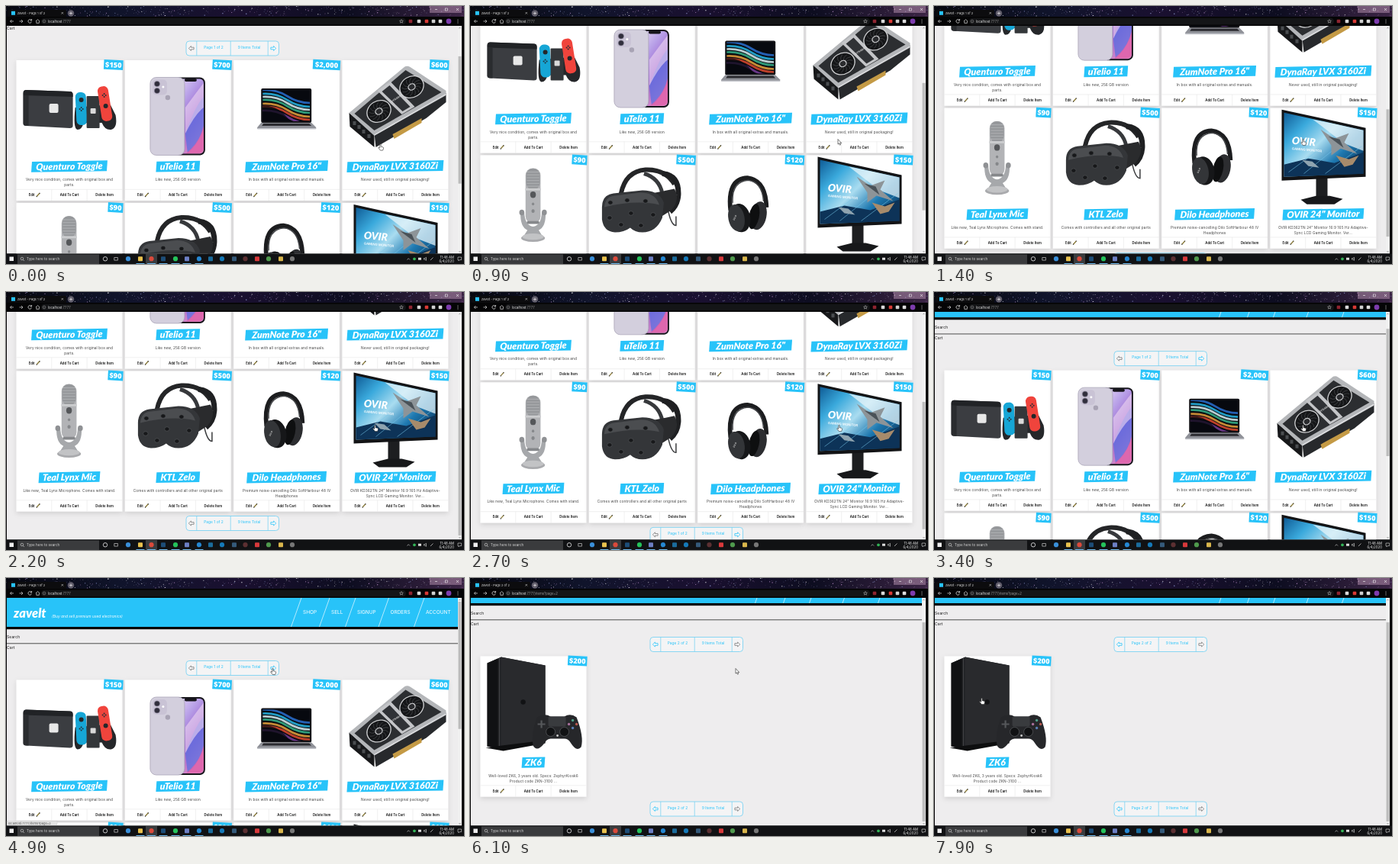
An HTML page that plays this animation: 600 by 338 pixels, repeating every 8 s.

```html
<!DOCTYPE html>
<html lang="en">
<head>
<meta charset="utf-8">
<title>Shop scroll</title>
<style>
  html, body { margin: 0; width: 100%; height: 100%; overflow: hidden; background: #000; }
  svg { display: block; width: 100vw; height: 100vh; }
  text { font-family: Inter, "Open Sans", sans-serif; }
  .bold { font-family: Lato, "Open Sans", sans-serif; font-weight: 900; font-style: italic; }
  .price { font-family: "Open Sans", Inter, sans-serif; font-weight: 800; }
  .note { letter-spacing: .11px; }
  .mid { text-anchor: middle; }
</style>
</head>
<body>
<svg id="stage" viewBox="0 0 600 338" xmlns="http://www.w3.org/2000/svg"></svg>
<script>
const BLUE = '#28c3f9', LOOP = 8000;
const CARD_W = 138.8, PITCH = 142.3, LEFT = 13.6, ROWS = [133.5, 320.5];

const rect = (x, y, w, h, fill, more = '') => `<rect x="${x}" y="${y}" width="${w}" height="${h}" fill="${fill}" ${more}/>`;
const dot = (x, y, r, fill, more = '') => `<circle cx="${x}" cy="${y}" r="${r}" fill="${fill}" ${more}/>`;
const oval = (x, y, rx, ry, fill, more = '') => `<ellipse cx="${x}" cy="${y}" rx="${rx}" ry="${ry}" fill="${fill}" ${more}/>`;
const path = (d, fill = 'none', more = '') => `<path d="${d}" fill="${fill}" ${more}/>`;
const line = (d, stroke, w = 1, more = '') => path(d, 'none', `stroke="${stroke}" stroke-width="${w}" ${more}`);
const text = (x, y, size, str, fill = '#222', more = '') => `<text x="${x}" y="${y}" font-size="${size}" fill="${fill}" ${more}>${str}</text>`;
const group = (move, body, more = '') => `<g transform="${move}" ${more}>${body}</g>`;
const gradient = (id, stops, x2, y2) => `<linearGradient id="${id}" x1="0" y1="0" x2="${x2}" y2="${y2}">` +
  stops.map((c, i) => `<stop offset="${i / (stops.length - 1)}" stop-color="${c}"/>`).join('') + '</linearGradient>';

let seed = 11;
const rnd = () => (seed = seed * 16807 % 2147483647) / 2147483647;

// Product pictures, drawn from the card's top left corner
const art = {
  console: () =>
    path('M9 43Q9 39 13 39L70 41Q74 41 74 45V86Q74 89 70 89L13 86Q9 86 9 83Z', '#3b3d41') +
    path('M13 39L70 41Q74 41 74 45V48L9 46V43Q9 39 13 39Z', '#212326') + path('M9 46L16 46V86L13 86Q9 86 9 83Z', '#2a2c2f') +
    rect(43, 57, 12, 12, '#e8e8e8', 'rx="2"') +
    path('M77 62Q74 90 80 91Q86 91 88 82H112Q116 92 124 91Q133 89 130 72L123 58Z', '#25272a') +
    rect(78, 42, 14, 43, '#16a6d6', 'rx="6" transform="rotate(-3 85 64)"') +
    rect(92, 47, 17, 42, '#34373a', 'rx="1"') + rect(97, 63, 7, 7, '#d9d9d9', 'rx="1"') +
    rect(109, 34, 14, 46, '#f0443c', 'rx="6" transform="rotate(-9 116 57)"') +
    dot(85, 52, 3, '#24272a') + dot(117, 60, 3, '#24272a') +
    [[83, 64], [87, 64], [85, 62], [85, 66], [113, 46], [117, 46], [115, 44], [115, 48]].map(p => dot(...p, 1, '#263038')).join(''),

  phone: () =>
    rect(64, 22.5, 41, 102, '#17161c', 'rx="7"') + rect(66, 24.5, 37, 98, 'url(#wall)', 'rx="5"') +
    path('M79 96Q92 60 103 48V88Q98 108 82 122Z', '#5b6ee0', 'opacity=".75"') +
    path('M79 62Q95 40 103 30V62Q92 70 79 96Z', '#f1d9f2', 'opacity=".6"') +
    path('M103 86V116Q102 122 96 122H80Q98 108 103 86Z', '#e05fa8', 'opacity=".8"') + rect(78, 24, 16, 4, '#17161c', 'rx="2"') +
    rect(33, 22.5, 45, 102, '#d3cfdd', 'rx="8" stroke="#aaa5b8" stroke-width=".8"') +
    rect(36, 25.5, 19, 20, '#c9c3d5', 'rx="5"') +
    [[42, 31], [42, 40]].map(p => dot(...p, 3.6, '#302e3c', 'stroke="#8e899c" stroke-width=".6"')).join('') +
    dot(50, 35, 1.5, '#fff') + dot(56, 49, 3.2, '#a8a3b4'),

  laptop: () =>
    rect(36, 37, 66, 45, '#141418', 'rx="2"') + rect(38, 39, 62, 41, '#07090f') +
    group('translate(0 0)',
      [['#2a6fd0', 47], ['#27b7e4', 52], ['#d9f1f5', 56], ['#36b38a', 60], ['#e8a23c', 65], ['#de4a2f', 69], ['#7a3f9c', 74]].map(([c, y]) =>
        line(`M38 ${y - 8}Q56 ${y - 9} 70 ${y}T100 ${y + 9}`, c, 2.7, 'opacity=".85"')).join('') +
      path('M38 60Q58 58 74 80H38Z', '#07090f', 'opacity=".75"'), 'clip-path="url(#screen)"') +
    path('M36 82H102L108 88V90H31V88Z', '#8f9198') + path('M39 83H99L102 86H37Z', '#2b2b30') + rect(31, 89, 77, 1.6, '#c2c4ca', 'rx=".8"'),

  gpu: () => {
    const blade = i => line('M5 0Q10 -1 13 4', '#3f4144', .9, `transform="rotate(${i * 360 / 13})"`);
    const fan = (x, y) => group(`translate(${x} ${y}) rotate(-32) scale(1 .84)`,
      dot(0, 0, 17, '#cfd0d2') + dot(0, 0, 15.6, '#151618') + Array.from({ length: 13 }, (_, i) => blade(i)).join('') +
      dot(0, 0, 5.4, '#c9cacc') + dot(0, 0, 4, '#2a2b2e'));
    return path('M42 96L136 43V55L110 76 44 114Z', '#27292c') + path('M66 97L104 76V82L68 103Z', '#c49a45') +
      path('M9 69L42 97V114L10 87Z', '#17181a') + path('M9 69L80 10Q84 6 89 9L136 40V46L42 99Z', '#b4b6b9') +
      path('M16 70L83 13 130 42 42 92Z', '#2c2e31') + path('M46 40L63 28 95 61 78 71Z', '#c4c5c8') + path('M52 41L62 33 89 61 79 67Z', '#303236') +
      fan(48, 67) + fan(91, 35) + line('M42 98L136 44.5', '#e0e1e3', 1.4) +
      text(0, 0, 3.6, 'DYNARAY', '#d8d8d8', 'class="mid" font-weight="600" transform="translate(72 51) rotate(-34)"') +
      [[14, 80], [20, 85], [26, 91], [33, 97]].map(([x, y]) => rect(x, y, 4, 5, '#4a4d50')).join('');
  },

  mic: () => group('translate(69 62) scale(.82 .93) translate(-69 -58)',
    path('M49 72L55 72Q56 90 69 92Q82 90 83 72H89Q90 92 78 97L86 108H52L60 97Q48 92 49 72Z', '#a6a8ab') +
    oval(69, 108, 19, 5.5, '#a9aaad') + oval(69, 106, 17, 4.5, '#c2c3c5') +
    rect(57, 10, 24, 77, '#b2b3b6', 'rx="10"') + rect(58, 10, 22, 30, '#96989b', 'rx="10"') +
    [15, 19, 23, 27, 31, 35].map(y => line(`M59 ${y}H79`, '#b7b8ba', .9)).join('') +
    rect(56.5, 38, 25, 3, '#cccdcf') + dot(69, 47, 4.5, '#55575a') + dot(69, 60, 2, '#86888b') + dot(69, 70, 2.6, '#85878a') +
    dot(51, 72, 4, '#8f9194') + dot(87, 72, 4, '#8f9194') + rect(59, 84, 20, 4, '#86888b', 'rx="2"')),

  headset: () =>
    line('M42 50Q48 21 74 19Q100 18 112 38', '#242527', 6) + line('M72 24Q92 30 96 50', '#37393c', 5) +
    line('M96 24Q118 26 117 52Q116 66 106 74', '#1f2022', 7) + path('M82 50L112 44Q120 58 108 72L92 82Z', '#2a2b2d') +
    line('M104 74Q108 92 114 92V80', '#3a3b3d', 1.5) +
    path('M17 68Q17 52 32 50L70 46Q92 46 98 62L96 82Q88 101 70 101Q60 101 54 95Q46 101 34 101Q19 100 17 84Z', '#343639') +
    path('M20 68Q21 54 34 53L68 49Q87 49 92 65Q62 58 20 68Z', '#4b4d50') +
    [[28, 62], [50, 59], [74, 60], [27, 82], [42, 91], [68, 92], [84, 78], [55, 76]].map(p => oval(...p, 3.2, 2.8, '#17181a', 'stroke="#515356" stroke-width=".7"')).join(''),

  headphones: () => group('translate(-2 1) scale(.96 .99)',
    line('M47 72Q42 30 70 29Q95 32 96 68', '#1c1d1f', 6) + line('M50 62Q48 34 71 32Q90 34 92 60', '#45474a', 1.5) +
    oval(85, 79, 11, 19, '#2c2d30', 'transform="rotate(12 85 79)"') + oval(79, 80, 7, 17, '#0e0f10', 'transform="rotate(12 79 80)"') +
    oval(60, 82, 14, 19, '#161719', 'transform="rotate(-12 60 82)"') + oval(55, 82, 11, 18, '#333538', 'transform="rotate(-12 55 82)"') +
    text(0, 0, 3.2, 'DILO', '#c8c8c8', 'class="mid" font-weight="700" transform="translate(54 82) rotate(-66)"')),

  monitor: () =>
    path('M60 90H75V119H60Z', '#1d1e20') + path('M40 120L60 115H78L95 119 84 126H48Z', '#17181a') +
    path('M15 2L125 26V90L15 95Z', '#131416') + path('M18 6L122 29V86L18 90Z', 'url(#sky)') +
    path('M18 74L50 66 84 72 122 58V86L18 90Z', '#0d3358') + path('M56 15L122 29V56L96 46Z', '#e6f4fa', 'opacity=".75"') +
    line('M24 84L62 56M44 86L86 52M72 86L120 50', '#76c6e8', .8, 'opacity=".7"') +
    path('M66 28L84 40 103 33 97 45 114 60 92 53 80 62 80 49Z', '#8d9498') + path('M76 37L96 52 91 41Z', '#4a5258') +
    path('M86 62L103 67 116 62 108 74 97 77Z', '#a78b6b') + path('M42 68L55 70 64 78 50 76Z', '#8fa4b0') +
    group('translate(28 47) rotate(5)', text(0, 0, 13.5, 'OVIR', '#fff', 'class="bold"') + text(1, 7.5, 4.3, 'GAMING MONITOR', '#fff', 'font-weight="600"')),

  tower: () =>
    path('M9 9L27 1 85 12V112L27 122 9 118Z', '#202124') + path('M9 9L23 3V121L9 118Z', '#101113') +
    path('M27 1L85 12V112L27 122Z', '#292a2d') + line('M25 2V122', '#4d4f52', .8) + dot(56, 60, 3.2, '#111214') +
    path('M7 120L28 117 85 110V114L30 124Z', '#0d0e0f') +
    path('M74 80Q84 74 92 79H110Q118 74 126 80Q136 106 132 119Q126 126 118 113Q115 108 110 108H92Q87 108 83 115Q74 126 69 117Q66 102 74 80Z', '#26272a') +
    rect(89, 79, 23, 13, '#393b3e', 'rx="2"') + dot(92, 99, 6, '#111214', 'stroke="#4a4c4f"') + dot(110, 99, 6, '#111214', 'stroke="#4a4c4f"') +
    line('M80 84V94M75 89H85', '#55575a', 2.2) +
    [[121, 84, '#4c9d85'], [126, 89, '#b5584f'], [121, 94, '#5a7db5'], [116, 89, '#a8709c']].map(([x, y, c]) => dot(x, y, 1.7, c)).join('') + dot(101, 104, 1.4, '#ccc')
};

const arrowIcon = (x, y, dir, color) => group(`translate(${x} ${y}) scale(${dir} 1)`,
  path('M-3.5 0L-.4 -3V-1.3H3.3V1.3H-.4V3Z', '#fff', `fill-opacity=".5" stroke="${color}" stroke-width=".8"`));

const pager = (y, page) =>
  rect(236, y, 121.5, 19, '#f4f4f5', 'rx="4" stroke="#6fd0f3" stroke-width=".8"') +
  line(`M249.8 ${y}v19M294.2 ${y}v19M343.2 ${y}v19`, '#6fd0f3', .7) +
  arrowIcon(242.8, y + 9.5, 1, page === 1 ? '#777' : BLUE) + arrowIcon(350.2, y + 9.5, -1, page === 1 ? BLUE : '#777') +
  text(272, y + 9.6, 4.9, `Page ${page} of 2`, BLUE, 'class="mid"') + text(318.5, y + 9.6, 4.9, '9 Items Total', BLUE, 'class="mid"');

function card(col, row, [pic, name, boxW, price, lines]) {
  const mid = CARD_W / 2, tagW = 5.4 * price.length + 3.6;
  const body = rect(0, 0, CARD_W, 184, '#fff', 'filter="url(#shade)"') + art[pic]() +
    group(`translate(${mid} 139) skewX(-5) rotate(-1)`,
      rect(-boxW / 2 + .6, -6.8, boxW - 1.2, 13.8, BLUE) + text(0, 4.4, 12.3, name, '#fff', 'class="bold mid"')) +
    group(`translate(${CARD_W + 1 - tagW / 2} 6) rotate(3)`,
      rect(-tagW / 2, -6.4, tagW, 12.8, BLUE) + text(0, 3.5, 9.3, price, '#fff', 'class="price mid"')) +
    lines.map((s, i) => text(mid, 158 + i * 7, 4.75, s, '#444', 'class="note mid"')).join('') +
    line(`M0 169.3H${CARD_W}M46.2 169.3V184M92.5 169.3V184`, '#e6e6e6', .6) +
    [[20, 'Edit'], [69.5, 'Add To Cart'], [115.5, 'Delete Item']].map(([x, s]) => text(x, 178, 4.3, s, '#111', 'class="mid" font-weight="600"')).join('') +
    line('M26.8 178.3L30.4 174.3', '#8a7a35', 1.3) + line('M26.2 179L27 178.1M30.1 174.7L30.8 173.9', '#333', 1.3);
  return group(`translate(${LEFT + col * PITCH} ${ROWS[row]})`, body);
}

const items = [
  ['console', 'Quenturo Toggle', 100, '$150', ['Very nice condition, comes with original box and', 'parts.']],
  ['phone', 'uTelio 11', 58, '$700', ['Like new, 256 GB version']],
  ['laptop', 'ZumNote Pro 16"', 109, '$2,000', ['In box with all original extras and manuals.']],
  ['gpu', 'DynaRay LVX 3160Zi', 127, '$600', ['Never used, still in original packaging!']],
  ['mic', 'Teal Lynx Mic', 81, '$90', ['Like new, Teal Lynx Microphone. Comes with stand.']],
  ['headset', 'KTL Zelo', 58, '$500', ['Comes with controllers and all other original parts']],
  ['headphones', 'Dilo Headphones', 105, '$120', ['Premium noise-cancelling Dilo SoftHarbour 48 IV', 'Headphones']],
  ['monitor', 'OVIR 24" Monitor', 107, '$150', ['OVIR KD362TN 24" Monitor 16:9 165 Hz Adaptive-', 'Sync LCD Gaming Monitor. Ver...']]
];
const lastItem = ['tower', 'ZK6', 31, '$200', ['Well-loved ZK6, 3 years old. Specs: ZephyrKiosk6', 'Product code ZKN-3100 ...']];

const header = () =>
  rect(1, 26, 591, 38, BLUE) + rect(1, 64, 591, 3.2, '#050505') +
  text(10, 51.5, 16.5, 'zavelt', '#fff', 'class="bold"') +
  text(60, 52, 4.9, '(Buy and sell premium used electronics)', '#fff', 'font-style="italic"') +
  [[389, 'SHOP'], [426, 'SELL'], [460, 'SIGNUP'], [503.5, 'ORDERS'], [550, 'ACCOUNT']].map(([x, s]) =>
    line(`M${x - 15.5} 64L${x - 2} 26`, '#d9f4ff', .8) + text(x, 47.3, 6.5, s, '#fff')).join('') +
  text(1, 78.5, 5.2, 'Search') + line('M1 85.8H592', '#222', .8) + text(1, 93, 5.2, 'Cart');

const stars = () => Array.from({ length: 380 }, () =>
  dot((rnd() * 600).toFixed(1), (rnd() * 13).toFixed(1), (.2 + rnd() * .5).toFixed(2), ['#fff', '#9aa7e0', '#c99ad6'][rnd() * 3 | 0], `opacity="${(.25 + rnd() * .7).toFixed(2)}"`)).join('');

const browser = () =>
  rect(0, 0, 600, 14, 'url(#space)') + stars() + rect(555, 0, 42, 9, '#c9a2c0', 'opacity=".45"') +
  line('M562 4.5h3M590 3l3 3m0-3l-3 3', '#fff', .6) + rect(575.5, 3, 3, 3, 'none', 'stroke="#fff" stroke-width=".5"') +
  rect(2, 5, 77, 9.5, '#0c0c0e', 'rx="2"') + rect(7, 6.8, 5, 5, BLUE) + text(15, 11, 4, '', '#ddd', 'id="tab"') +
  line('M72.5 8l2.6 2.6m0-2.6l-2.6 2.6', '#ccc', .6) + dot(85, 9.5, 4.2, '#77727e', 'opacity=".8"') + line('M83 9.5h4M85 7.5v4', '#fff', .6) +
  rect(0, 14, 600, 12, '#050506') + rect(46, 15.7, 478, 8.8, '#141517', 'rx="4.4"') +
  line('M10 20H5.5l2-2m-2 2l2 2M17.5 20H22l-2-2m2 2l-2 2', '#ddd', .7) + line('M33.2 18.6a2.3 2.3 0 1 0 .3 2M33.6 17v2h-2', '#ddd', .8) +
  line('M39 20l2.6-2.4 2.6 2.4M39.8 19.6v2.8h3.6v-2.8', '#ddd', .7) +
  dot(50, 20, 1.9, 'none', 'stroke="#aaa" stroke-width=".5"') + line('M50 19.7v1.2', '#aaa', .5) +
  text(55, 21.6, 4.3, 'localhost<tspan fill="#999" id="url"></tspan>', '#eee') +
  path('M518 17.6l.7 1.6 1.7.1-1.3 1.1.4 1.7-1.5-.9-1.5.9.4-1.7-1.3-1.1 1.7-.1Z', 'none', 'stroke="#ccc" stroke-width=".5"') +
  [[530, '#8e2430'], [541, '#d8d8d8'], [551, '#d93a35'], [560, '#cfcfcf'], [569, '#ddd']].map(([x, c]) => rect(x - 2.3, 17.7, 4.6, 4.6, c, 'rx="1"')).join('') +
  dot(580, 20, 3.4, '#7d3cae') + [18, 20, 22].map(y => dot(592, y, .55, '#ddd')).join('');

const taskbar = () => {
  const icons = [[160, '#3a8fd9'], [176, '#e9c14d'], [190.5, '#db4a3b'], [206, '#1d4d78'], [222, '#25c35b'], [237, '#6c7fc4'], [253, '#2587d2'], [268, '#1b6c9c'],
    [283, '#1579b8'], [299, '#355a7a'], [313.5, '#5c3032'], [329, '#d8393b'], [344, '#4f9a4d'], [360, '#d9b64c'], [375, '#777']];
  return rect(0, 324.5, 600, 13.5, '#111214') + rect(4.5, 328.5, 5.5, 5.5, '#eee') +
    rect(15, 325.5, 107, 12.5, '#3a3b3d') + dot(21, 331, 1.8, 'none', 'stroke="#ddd" stroke-width=".6"') + line('M22.3 332.3l1.7 1.7', '#ddd', .6) +
    text(27, 333.2, 4.6, 'Type here to search', '#d6d6d6') +
    dot(130, 331.3, 2.7, 'none', 'stroke="#eee" stroke-width=".8"') + line('M141.8 329.5h4.6v3.6h-4.6Z', '#ccc', .7) +
    rect(183, 325, 15, 13, '#3a3c3e') +
    icons.map(([x, c], i) => i % 2 ? rect(x - 3, 328.2, 6, 6, c, 'rx="1"') : dot(x, 331.2, 3.1, c)).join('') +
    [176, 190.5, 206, 222, 237, 253].map(x => rect(x - 5.5, 337, 11, 1, '#6cb7ea')).join('') +
    line('M525.5 332.5l1.8-1.8 1.8 1.8', '#ddd', .6) + dot(535, 331.3, 1.9, '#33b457') + rect(540, 329.7, 4, 3, '#ddd') + line('M547.5 330.5h1.5l1.5-1.2v4l-1.5-1.2h-1.5Z', '#ddd', .6) + line('M556 333l3.5-3.5', '#ddd', .7) +
    text(587, 330.6, 4.4, '11:48 AM', '#e8e8e8', 'text-anchor="end"') + text(587, 336.4, 4.4, '6/4/2020', '#e8e8e8', 'text-anchor="end"') +
    line('M592 329h4.6v3.6h-2.4l-1.2 1.3v-1.3h-1Z', '#ddd', .6);
};

document.getElementById('stage').innerHTML = `<defs>
  ${gradient('wall', ['#eadcf6', '#b9a2e8', '#9a62cf', '#d98ac8'], .5, 1)}
  ${gradient('sky', ['#0f5c96', '#3aa9dc', '#a9dcf0', '#1d78b0', '#0c3860'], 1, .8)}
  ${gradient('space', ['#06070f', '#10142b', '#1a1030', '#0d0d20', '#3b2444'], 1, 0)}
  <filter id="shade" x="-10%" y="-10%" width="120%" height="120%"><feDropShadow dx="0" dy="2.5" stdDeviation="3.2" flood-opacity=".13"/></filter>
  <clipPath id="screen">${rect(38, 39, 62, 41, '#fff')}</clipPath>
  <clipPath id="view">${rect(1, 26, 591, 298.5, '#fff')}</clipPath></defs>` +
  rect(0, 0, 600, 338, '#000') + rect(1, 26, 591, 298.5, '#eeedee') +
  `<g clip-path="url(#view)"><g id="page">${header()}` +
  `<g id="first">${pager(108.5, 1)}${items.map((it, i) => card(i % 4, i >> 2, it)).join('')}${pager(510.5, 1)}</g>` +
  `<g id="second">${pager(108.5, 2)}${card(0, 0, lastItem)}${pager(324, 2)}</g></g></g>` +
  rect(592, 26, 5, 298.5, '#f1f1f1') + line('M593.4 29.4l1.1-1.3 1.1 1.3M593.4 321l1.1 1.3 1.1-1.3', '#666', .6) + rect(592.5, 31, 4, 10, '#bdbdbd', 'id="thumb"') +
  `<g id="status">${rect(1, 318.5, 66, 6, '#e4e4e4', 'stroke="#bbb" stroke-width=".3"')}${text(3, 323, 4, 'localhost:7777/items?page=2', '#555')}</g>` +
  browser() + taskbar() +
  `<g id="cursor" stroke="#222" stroke-width=".6" fill="#fff">
    <path id="hand" d="M-1.2 -3.4c0-1 1.4-1 1.4 0v2.6l2.4.6c.8.2 1 .7.9 1.4l-.5 2-.4.9h-3.2l-2.5-3.2c-.4-.7.4-1.2 1-.7l.9.7Z"/>
    <path id="pointer" d="M-2 -4V2.6L-.5 1.4 .5 3.7 1.6 3.2 .7 1.1H2.7Z"/></g>`;

const ids = ['page', 'first', 'second', 'thumb', 'status', 'tab', 'url', 'cursor', 'hand', 'pointer'];
const parts = Object.fromEntries(ids.map(id => [id, document.getElementById(id)]));
const show = (node, on) => node.setAttribute('display', on ? 'inline' : 'none');
const smooth = u => u * u * (3 - 2 * u);
const linear = u => u;

// Keys are [time, values, easing into this key]
const scrollKeys = [[0, [62.5]], [350, [62.5]], [700, [125]], [1000, [125]], [1650, [217]], [2650, [217]],
  [3000, [115], linear], [3400, [31], linear], [3600, [0], linear], [5750, [0]], [6050, [31]]];
const mouseKeys = [[0, [491, 185]], [90, [491, 185]], [200, [484, 178.5]], [3850, [484, 178.5]], [4600, [350, 122.5]],
  [6300, [350, 122.5]], [7100, [84, 226]], [7250, [84, 226]], [7750, [63, 161.5]]];

function track(keys, t) {
  const i = keys.findIndex(k => k[0] > t);
  if (i < 0) return keys[keys.length - 1][1];
  const [t0, a] = keys[i - 1], [t1, b, ease = smooth] = keys[i];
  const u = ease((t - t0) / (t1 - t0));
  return a.map((v, n) => v + (b[n] - v) * u);
}

function isLink(x, y, page) {
  const col = Math.floor((x - LEFT) / PITCH);
  const inCard = x - LEFT - col * PITCH < CARD_W && col >= 0 && col < (page === 1 ? 4 : 1);
  const overCard = ROWS.slice(0, page === 1 ? 2 : 1).some(top => y > top && y < top + 147);
  return inCard && overCard;
}

function draw(t) {
  const [scroll] = track(scrollKeys, t), [x, y] = track(mouseKeys, t);
  const page = t < 5500 ? 1 : 2, height = page === 1 ? 515.5 : 329.5;
  const docY = y + scroll;
  const onNext = x > 343 && x < 358 && docY > 108 && docY < 128;
  const link = onNext || isLink(x, docY, page);
  parts.page.setAttribute('transform', `translate(0 ${-scroll})`);
  show(parts.first, page === 1);
  show(parts.second, page === 2);
  parts.thumb.setAttribute('y', 31 + scroll * 288 / height);
  parts.thumb.setAttribute('height', 298.5 * 288 / height);
  show(parts.status, onNext && page === 1);
  parts.tab.textContent = `zavelt - Page ${page} of 2`;
  parts.url.textContent = page === 1 ? ':7777' : ':7777/items?page=2';
  parts.cursor.setAttribute('transform', `translate(${x} ${y})`);
  show(parts.hand, link);
  show(parts.pointer, !link);
}

const start = performance.now();
function tick() {
  draw((performance.now() - start) % LOOP);
  requestAnimationFrame(tick);
}
tick();
</script>
</body>
</html>
```
